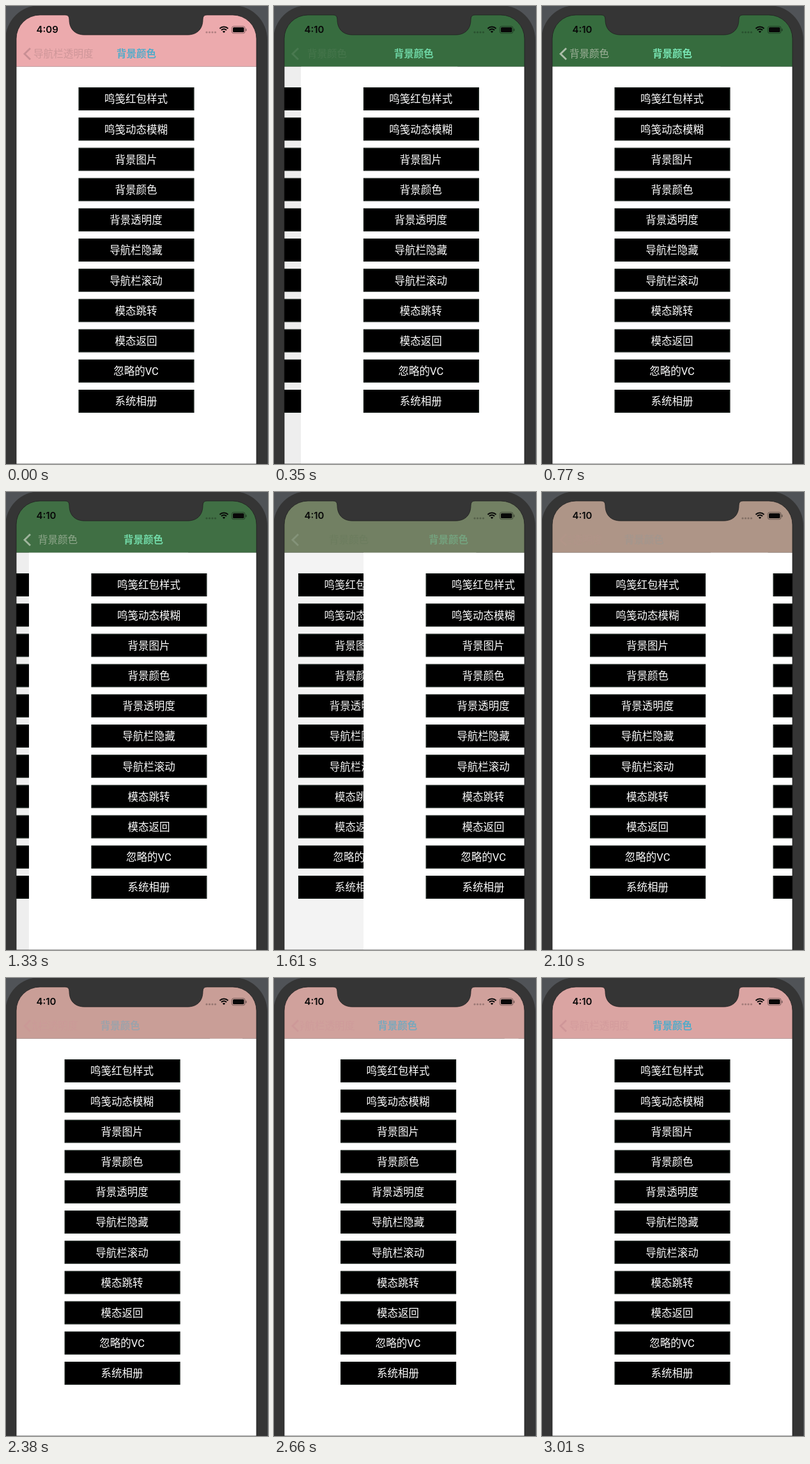
These frames come from a looping animation (410x715 px, 3080 ms). An HTML page with a canvas:

```html
<!DOCTYPE html>
<html lang="zh-CN">
<head>
<meta charset="utf-8">
<title>背景颜色</title>
<style>
html, body { margin: 0; width: 100%; height: 100%; overflow: hidden; background: #353535; }
canvas { display: block; width: 410px; height: 715px; }
</style>
</head>
<body>
<canvas id="stage"></canvas>
<script>
const W = 410, H = 715, LOOP = 3080, STEP = 70;
const LEFT = 16, RIGHT = 392, TOP = 14, BAR = 94.5, SPAN = RIGHT - LEFT;
const FONT = 'Roboto, "Noto Sans CJK SC", "Noto Sans CJK", sans-serif';
const LABELS = ['鸣笺红包样式', '鸣笺动态模糊', '背景图片', '背景颜色', '背景透明度',
  '导航栏隐藏', '导航栏滚动', '模态跳转', '模态返回', '忽略的VC', '系统相册'];
const GREEN = [54, 108, 62], PINK = [236, 170, 173];

const canvas = document.getElementById('stage');
const ctx = canvas.getContext('2d');
const dpr = window.devicePixelRatio || 1;
canvas.width = W * dpr;
canvas.height = H * dpr;

const clamp = v => Math.max(0, Math.min(1, v));
const rgb = c => `rgb(${c.map(Math.round).join(',')})`;
const mix = (a, b, k) => a.map((v, i) => v + (b[i] - v) * k);
const arrive = p => clamp((p - 0.5) * 2) ** 2;

// Interpolates [time, value] pairs
function track(keys, t) {
  let i = 1;
  while (i < keys.length - 1 && t > keys[i][0]) i++;
  const [t0, v0] = keys[i - 1], [t1, v1] = keys[i];
  return v0 + (v1 - v0) * clamp((t - t0) / (t1 - t0));
}

// 0 = upper page covers the screen, 1 = upper page is gone
const DRAG = [[840, 0], [1050, 0.13], [1260, 0.04], [1330, 0.053], [1610, 0.33],
  [1890, 0.55], [2380, 0.806], [2870, 1]];
const TINT = [[1190, 0.02], [1330, 0.053], [1610, 0.33], [1890, 0.55],
  [2380, 0.806], [3010, 0.9]];

const pushed = t => (1 - clamp((t - 35) / 525)) ** 2.9;

function text(str, x, y, size, color, weight = 400, align = 'left', alpha = 1) {
  if (alpha <= 0) return;
  ctx.globalAlpha = alpha;
  ctx.font = `${weight} ${size}px ${FONT}`;
  ctx.textAlign = align;
  ctx.fillStyle = color;
  ctx.fillText(str, x, y);
  ctx.globalAlpha = 1;
}

function screenPath() {
  const p = new Path2D(), r = 37;
  p.moveTo(LEFT, H);
  p.lineTo(LEFT, TOP + r);
  p.arcTo(LEFT, TOP, LEFT + r, TOP, r);
  p.lineTo(93, TOP);
  p.quadraticCurveTo(99, TOP, 99, 21);
  p.bezierCurveTo(99, 36, 108, 45, 123, 45);
  p.lineTo(284, 45);
  p.bezierCurveTo(299, 45, 308, 36, 308, 21);
  p.quadraticCurveTo(308, TOP, 314, TOP);
  p.lineTo(RIGHT - r, TOP);
  p.arcTo(RIGHT, TOP, RIGHT, TOP + r, r);
  p.lineTo(RIGHT, H);
  p.closePath();
  return p;
}
const SCREEN = screenPath();

function page(dx) {
  ctx.fillStyle = '#fff';
  ctx.fillRect(LEFT + dx, BAR, SPAN, H);
  LABELS.forEach((label, i) => {
    const x = 113.5 + dx, y = 127 + i * 47.2;
    ctx.fillStyle = '#000';
    ctx.fillRect(x, y, 181, 36);
    ctx.strokeStyle = '#17231c';
    ctx.lineWidth = 1;
    ctx.strokeRect(x + 1, y + 1, 179, 34);
    text(label, 203.5 + dx, y + 24.3, 16.5, '#fff', 400, 'center');
  });
}

function chevron(color, alpha) {
  if (alpha <= 0) return;
  ctx.globalAlpha = alpha;
  ctx.strokeStyle = color;
  ctx.lineWidth = 2.8;
  ctx.beginPath();
  ctx.moveTo(38, 66);
  ctx.lineTo(29, 74.7);
  ctx.lineTo(38, 83.5);
  ctx.stroke();
  ctx.globalAlpha = 1;
}

function navBar(p, q, pushing) {
  ctx.fillStyle = rgb(mix(GREEN, PINK, q));
  ctx.fillRect(LEFT, 0, SPAN, BAR);

  const shared = 43 + 130 * p;
  const backAlpha = clamp(pushing ? 1 - 12 * p : 1 - 2.5 * p);
  const backColor = rgb(mix([158, 177, 153], [82, 110, 76], clamp(p * 4 - 0.2)));
  text('背景颜色', shared, 80, 15.5, backColor, 400, 'left', backAlpha);
  text('背景颜色', 173 + 209 * p, 80, 15.5, '#78e6b4', 700, 'left', clamp(1 - 2 * p));
  chevron('#acbea9', clamp(pushing ? 1 - 12 * p : 1 - 2.1 * p));

  const low = arrive(q);
  ctx.save();
  ctx.beginPath();
  ctx.rect(41, 50, 330, 44);
  ctx.clip();
  text('导航栏透明度', 43 - 124 * (1 - p), 80, 15.6, '#ce9699', 400, 'left', low);
  ctx.restore();
  text('背景颜色', shared, 80, 15.5, '#52abc9', 700, 'left', arrive(p));
  chevron('#c98f94', low);
}

function statusBar(clock) {
  ctx.font = '600 15px Inter, sans-serif';
  ctx.textAlign = 'left';
  ctx.fillStyle = '#080808';
  ctx.fillText(clock, 47.5, 42);

  ctx.fillStyle = 'rgba(0,0,0,.25)';
  for (let i = 0; i < 4; i++) {
    ctx.beginPath();
    ctx.arc(314 + i * 4.5, 41, 1.6, 0, 7);
    ctx.fill();
  }

  ctx.strokeStyle = ctx.fillStyle = '#080808';
  ctx.lineWidth = 2.1;
  for (const r of [9.2, 5.7]) {
    ctx.beginPath();
    ctx.arc(341, 41.7, r, -Math.PI * 0.75, -Math.PI * 0.25);
    ctx.stroke();
  }
  ctx.beginPath();
  ctx.moveTo(341, 42);
  ctx.arc(341, 42, 3, -Math.PI * 0.75, -Math.PI * 0.25);
  ctx.fill();

  ctx.beginPath();
  ctx.roundRect(355, 33.3, 17.5, 7.8, 1.5);
  ctx.fill();
  ctx.strokeStyle = 'rgba(0,0,0,.4)';
  ctx.lineWidth = 1;
  ctx.beginPath();
  ctx.roundRect(353.3, 31.7, 20.8, 11, 3);
  ctx.stroke();
  ctx.fillStyle = 'rgba(0,0,0,.45)';
  ctx.fillRect(375, 35.5, 1.4, 3.6);
}

function draw(t) {
  const pushing = t < 840;
  const p = pushing ? pushed(t) : track(DRAG, t);
  const q = pushing ? p * p : t < 1190 ? 0.02 : track(TINT, t);
  const front = SPAN * p;

  ctx.setTransform(dpr, 0, 0, dpr, 0, 0);
  ctx.fillStyle = '#505357';
  ctx.fillRect(0, 0, W, H);
  ctx.fillStyle = '#353535';
  ctx.beginPath();
  ctx.roundRect(-1, -1, 410, H + 80, 54);
  ctx.fill();

  ctx.save();
  ctx.clip(SCREEN);
  page(-0.3 * (SPAN - front));
  if (t < 1680) {
    ctx.fillStyle = `rgba(0,0,0,${0.07 * (1 - p)})`;
    ctx.fillRect(LEFT, BAR, front, H);
  }
  if (p < 1) page(front);
  navBar(p, q, pushing);
  ctx.restore();
  ctx.strokeStyle = '#202020';
  ctx.lineWidth = 0.8;
  ctx.stroke(SCREEN);
  statusBar(t < STEP ? '4:09' : '4:10');
}

const start = performance.now();
function tick() {
  const t = (performance.now() - start) % LOOP;
  draw(Math.floor(t / STEP) * STEP);
  requestAnimationFrame(tick);
}
tick();
</script>
</body>
</html>
```
